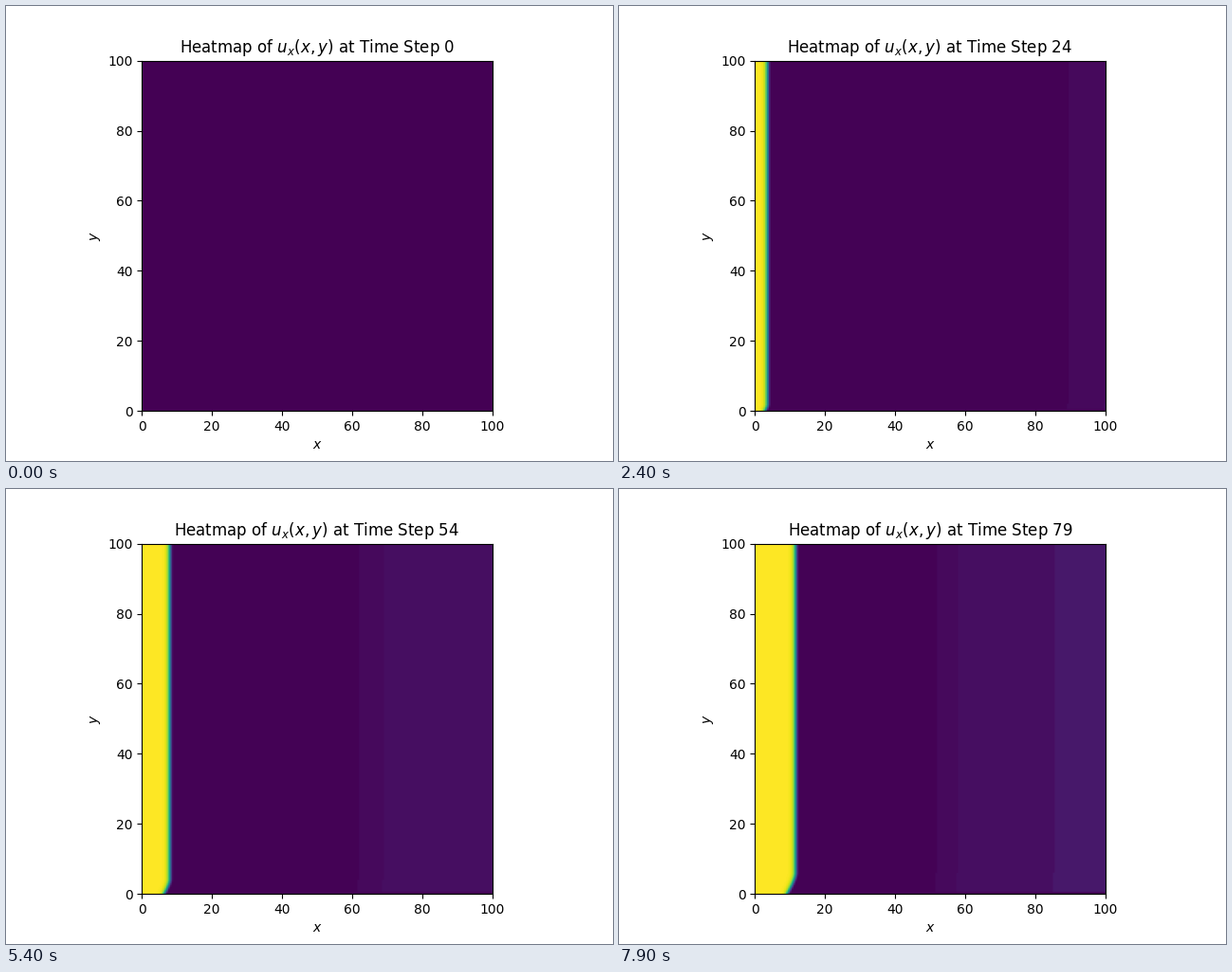
A matplotlib script that plays this animation: 640x480 px, repeating every 8 s.

```python
import numpy as np
import matplotlib.pyplot as plt
from matplotlib.animation import FuncAnimation

STEPS = 80
CELLS = 200
SIZE = 100

axis = (np.arange(CELLS) + 0.5) * SIZE / CELLS
X, Y = np.meshgrid(axis, axis)

# (threshold of the slow growth, colour level reached)
BANDS = [(18.9, 6 / 255), (24.1, 9.3 / 255), (55.9, 16.3 / 255)]
BASE = 1.5 / 255


def wall(step):
    """Influence of the lower wall: 1 at y = 0, fading to 0 at its edge."""
    return np.clip(1 - Y / (0.075 * step), 0, 1)


def inflow(step):
    """Steep front entering from the left, held back near the lower wall."""
    front = 0.2 + 0.1455 * step - 0.031 * step * wall(step) ** 1.5
    return np.exp(-np.log(2) * np.exp(np.minimum(2.2 * (X - front), 6)))


def outflow(step):
    """Stepped levels spreading from the right."""
    shifted = X + 0.5 * (wall(step) > 0)
    growth = step * (shifted / SIZE) ** 2.18
    level = np.full_like(X, BASE)
    for limit, value in BANDS:
        level[growth > limit] = value
    level[0] = BASE
    return level


def field(step):
    if step == 0:
        return np.zeros_like(X)
    u = np.maximum(inflow(step), outflow(step))
    u[:, 0] = 1
    return u


fig, ax = plt.subplots(figsize=(6.4, 4.8), dpi=100)
image = ax.imshow(field(0), origin="lower", extent=[0, SIZE, 0, SIZE],
                  cmap="viridis", vmin=0, vmax=1)
title = ax.set_title("")
ax.set_xlabel("$x$")
ax.set_ylabel("$y$")


def update(step):
    image.set_data(field(step))
    title.set_text(f"Heatmap of $u_x(x, y)$ at Time Step {step}")
    return image, title


anim = FuncAnimation(fig, update, frames=STEPS, interval=100,
                     repeat=True, repeat_delay=0, blit=False)
plt.show()
```
